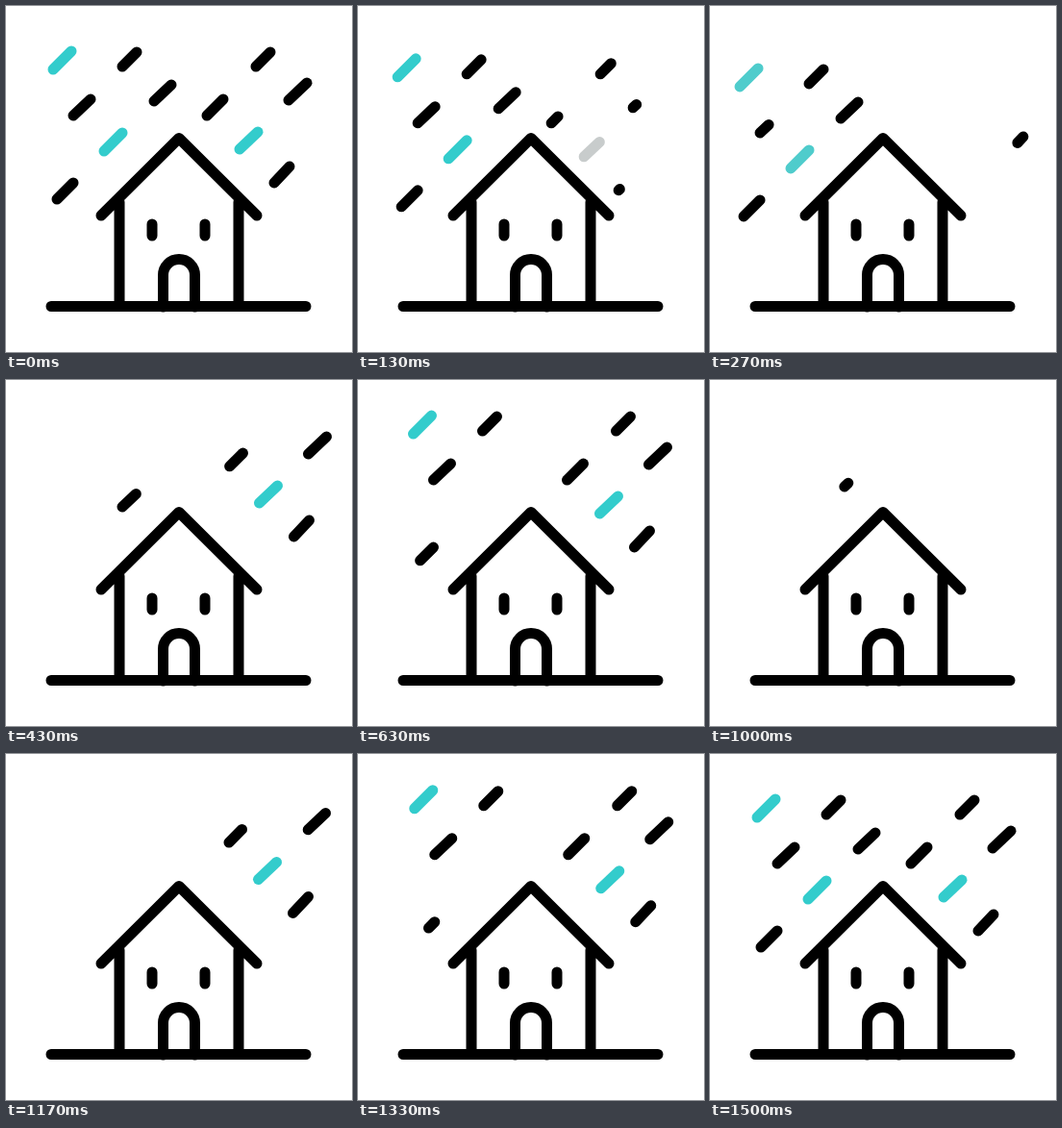
These frames come from a looping animation (360 px wide and 360 px high, 1.67 s). An HTML page with a canvas:

```html
<!DOCTYPE html>
<html lang="en">
<head>
<meta charset="utf-8">
<title>House in the rain</title>
<style>
  html, body { margin: 0; width: 100%; height: 100%; overflow: hidden; background: #fff; }
  canvas { display: block; }
</style>
</head>
<body>
<canvas id="stage" width="360" height="360"></canvas>
<script>
const ctx = document.getElementById('stage').getContext('2d');
const LOOP = 1670;
const STEP = 100 / 3;
const LAST_MOVE = 1500;
const TRIM = 90;

// Offset of the rain during each pass: [time, dx, dy]
const passes = [
  [[30, 0, 0], [267, -18, 18], [433, -33, 33]],
  [[233, 33, -33], [433, 20.5, -21], [633, 8.5, -10], [833, -4, 0.5], [1030, -16, 14]],
  [[1033, 28, -27.5], [1167, 19.5, -18.5], [1500, 0, 0]]
];

// Lower end, upper end, then the times of leaving, returning, leaving, returning
const drops = [
  { line: [49, 66, 68, 47], times: [340, 480, 850, 1215], teal: true },
  { line: [121, 63, 136, 48], times: [300, 470, 890, 1205] },
  { line: [70, 114, 88, 97], times: [222, 500, 870, 1235] },
  { line: [154, 99, 172, 82], times: [415, 680, 930, 1400] },
  { line: [102, 151, 121, 132], times: [340, 650, 850, 1390], teal: true },
  { line: [53, 201, 70, 184], times: [310, 560, 900, 1300] },
  { line: [260, 63, 275, 48], times: [110, 440, 790, 1190] },
  { line: [294, 98, 313, 80], times: [60, 320, 690, 1080] },
  { line: [209, 114, 226, 97], times: [80, 360, 720, 1095] },
  { line: [243, 149, 262, 131], times: [120, 300, 725, 1060], teal: true },
  { line: [279, 184, 295, 167], times: [50, 233, 690, 1010] }
];

const clamp = v => Math.max(0, Math.min(1, v));
const mix = (a, b, k) => a + (b - a) * k;

function offsetAt(keys, t) {
  if (t <= keys[0][0] && keys[0][1] === 0) return [0, 0];
  let i = 0;
  while (i < keys.length - 2 && t > keys[i + 1][0]) i++;
  const [t0, x0, y0] = keys[i];
  const [t1, x1, y1] = keys[i + 1];
  const k = (t - t0) / (t1 - t0);
  return [mix(x0, x1, k), mix(y0, y1, k)];
}

function stroke(color, draw) {
  ctx.strokeStyle = color;
  ctx.beginPath();
  draw();
  ctx.stroke();
}

function segment(x1, y1, x2, y2) {
  ctx.moveTo(x1, y1);
  ctx.lineTo(x2, y2);
}

function drawDrop({ line: [x1, y1, x2, y2], times, teal }, t) {
  const [leave1, back1, leave2, back2] = times;
  const pass = t >= back2 ? 2 : t >= back1 ? 1 : 0;
  const leave = [leave1, leave2, Infinity][pass];
  const back = [-Infinity, back1, back2][pass];

  // Lines grow from the upper end and shrink into the lower end.
  const from = 1 - clamp((t - back) / TRIM);
  const to = 1 - clamp((t - leave) / TRIM);
  if (to - from <= 0.02) return;

  const [dx, dy] = offsetAt(passes[pass], t);
  const fade = clamp((t - leave + TRIM) / TRIM);
  const color = teal ? `rgb(${Math.round(mix(51, 200, fade))},204,204)` : '#000';
  stroke(color, () => segment(
    mix(x1, x2, from) + dx, mix(y1, y2, from) + dy,
    mix(x1, x2, to) + dx, mix(y1, y2, to) + dy
  ));
}

function drawHouse() {
  stroke('#000', () => {
    segment(47, 312.5, 312, 312.5);
    segment(118, 204, 118, 312);
    segment(242, 204, 242, 312);
    segment(152, 227, 152, 239);
    segment(207, 227, 207, 239);
    segment(99, 218, 180, 137.5);
    ctx.lineTo(261, 218);
    ctx.moveTo(163.5, 313);
    ctx.lineTo(163.5, 280);
    ctx.arc(180, 280, 16.5, Math.PI, 0);
    ctx.lineTo(196.5, 313);
  });
}

function render(now) {
  const step = Math.floor((now % LOOP + 4) / STEP);
  const t = Math.min(step * STEP, LAST_MOVE);
  ctx.fillStyle = '#fff';
  ctx.fillRect(0, 0, 360, 360);
  ctx.lineWidth = 11;
  ctx.lineCap = ctx.lineJoin = 'round';
  drops.forEach(drop => drawDrop(drop, t));
  drawHouse();
}

const start = performance.now();
function tick() {
  render(performance.now() - start);
  requestAnimationFrame(tick);
}
tick();
</script>
</body>
</html>
```
